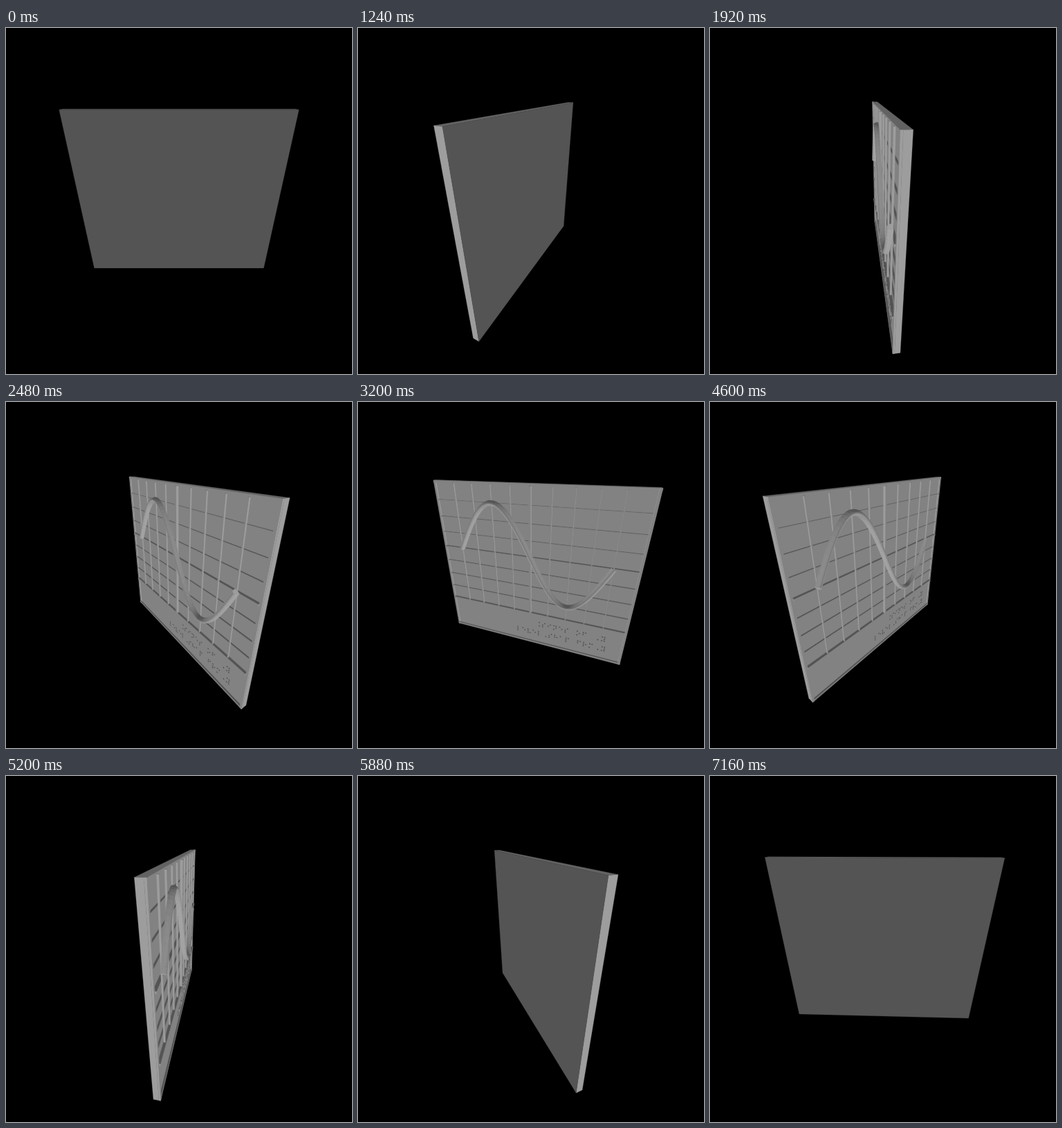
An HTML page with a canvas that plays this animation: 500 by 500 pixels, repeating every 7.2 s.

```html
<!DOCTYPE html>
<html lang="en">
<head>
<meta charset="utf-8">
<title>Turning tactile plate</title>
<style>
  html, body { margin: 0; width: 100%; height: 100%; overflow: hidden; background: #000; }
  canvas { display: block; width: 500px; height: 500px; }
</style>
</head>
<body>
<canvas id="stage" width="500" height="500"></canvas>
<script>
const ctx = document.getElementById("stage").getContext("2d");

// Camera: looks at the centre of the plate from slightly above its top edge.
const FOCAL = 329, DIST = 2, CAM_Z = 1.0164;
const PITCH = Math.atan2(CAM_Z, DIST);
const CP = Math.cos(PITCH), SP = Math.sin(PITCH);

// Plate: s runs right as seen from the front, z up, y out of the front face.
const W = 0.965, H = 0.8405, BACK = -0.0335, FRONT = 0.0255;
const LIP = 0.018, PANEL = FRONT - 0.014;
const AXIS_Z = 0.192, STEP_S = 0.1875, STEP_Z = 0.158;
const FLOOR_Z = AXIS_Z - 4 * STEP_Z;
const SHADE = { front: 130, back: 84, side: 157, rim: 98, ledge: 84, dot: 74 };

const ROWS = [
  { text: "⠨⠎⠊⠝⠑⠎⠀⠕⠋⠀⠠⠽", s: 0.09, z: -0.57 },
  { text: "⠇⠑⠧⠑⠇⠠⠎⠓⠁⠏⠀⠋⠗⠍⠠⠽", s: -0.14, z: -0.695 }
];

let cos, sin, camS, camY;

function project([s, z, y]) {
  const x = -s * cos - y * sin;
  const far = DIST - s * sin + y * cos;
  const up = z - CAM_Z;
  const k = FOCAL / (far * CP - up * SP);
  return [250 + x * k, 250 - (far * SP + up * CP) * k];
}

function poly(points, level) {
  const v = Math.round(level);
  ctx.fillStyle = ctx.strokeStyle = `rgb(${v},${v},${v})`;
  ctx.beginPath();
  points.forEach(p => ctx.lineTo(...project(p)));
  ctx.closePath();
  ctx.fill();
  ctx.stroke();
}

function box(s0, s1, z0, z1, y0, y1, top = SHADE.ledge) {
  const wall = s => poly([[s, z0, y0], [s, z1, y0], [s, z1, y1], [s, z0, y1]], SHADE.side);
  const face = (y, level) => poly([[s0, z0, y], [s1, z0, y], [s1, z1, y], [s0, z1, y]], level);
  poly([[s0, z1, y0], [s1, z1, y0], [s1, z1, y1], [s0, z1, y1]], top);
  if (camS > s1) wall(s1);
  if (camS < s0) wall(s0);
  if (camY > y1) face(y1, SHADE.front);
  if (camY < y0) face(y0, SHADE.back);
}

// Far parts first, so near ones cover them.
const farToNear = list => camS > 0 ? list : list.slice().reverse();

const MINOR = { half: 0.003, top: PANEL + 0.014 };
const MAJOR = { half: 0.008, top: PANEL + 0.024 };

function drawGrid() {
  for (let k = 3; k >= -4; k--) {
    const { half, top } = k % 4 ? MINOR : MAJOR;
    const z = AXIS_Z + k * STEP_Z;
    box(-W + LIP, W - LIP, z - half, z + half, PANEL, top);
  }
  for (const k of farToNear([-4, -3, -2, -1, 0, 1, 2, 3, 4])) {
    const { half, top } = k ? MINOR : MAJOR;
    box(k * STEP_S - half, k * STEP_S + half, FLOOR_Z, H - LIP, PANEL, top);
  }
}

const SEGS = 64, FACETS = 8, TUBE = 0.023, RISE = 0.042;

function ringAt(i) {
  const a = 2 * Math.PI * i / SEGS, amp = 3 * STEP_Z;
  const s = (i / SEGS - 0.5) * 8 * STEP_S;
  const z = AXIS_Z + amp * Math.sin(a);
  const slope = amp * Math.cos(a) * 2 * Math.PI / (8 * STEP_S);
  const len = Math.hypot(1, slope);
  const ns = -slope / len, nz = 1 / len;
  const pts = [];
  for (let k = 0; k <= FACETS; k++) {
    const b = Math.PI * k / FACETS, r = TUBE * Math.cos(b);
    pts.push([s + ns * r, z + nz * r, PANEL + RISE * Math.sin(b)]);
  }
  return { pts, ns, nz };
}

const rings = Array.from({ length: SEGS + 1 }, (_, i) => ringAt(i));
const order = Array.from({ length: SEGS }, (_, i) => i);

// Ambient light plus one low lamp on either side of the front.
function lit(ns, nz, ny) {
  const lamp = side => Math.max(0, 73 * side * ns + 23 * ny - 28 * nz);
  return SHADE.back + lamp(1) + lamp(-1);
}

function drawCurve() {
  for (const i of farToNear(order)) {
    const { pts: p, ns, nz } = rings[i], q = rings[i + 1].pts;
    for (let k = 0; k < FACETS; k++) {
      const b = Math.PI * (k + 0.5) / FACETS;
      const across = Math.cos(b) / TUBE, out = Math.sin(b) / RISE;
      const len = Math.hypot(across, out);
      const n = [ns * across / len, nz * across / len, out / len];
      const [s, z, y] = p[k];
      if ((camS - s) * n[0] + (CAM_Z - z) * n[1] + (camY - y) * n[2] <= 0) continue;
      poly([p[k], p[k + 1], q[k + 1], q[k]], lit(...n));
    }
  }
  if (camS > 4 * STEP_S) poly(rings[SEGS].pts, SHADE.side);
  if (camS < -4 * STEP_S) poly(rings[0].pts, SHADE.side);
}

// Braille code points: bits 0-2 left column, bits 3-5 right column.
function drawBraille() {
  const r = 0.0048, gap = 0.024, y = PANEL + 0.006;
  for (const row of ROWS) {
    [...row.text].forEach((ch, i) => {
      const bits = ch.codePointAt(0) - 0x2800;
      for (let b = 0; b < 6; b++) {
        if (!(bits >> b & 1)) continue;
        const s = row.s + i * 0.0615 + (b > 2 ? gap : 0) - gap / 2;
        const z = row.z + gap * (1 - b % 3);
        poly([[s - r, z - r, y], [s + r, z - r, y], [s + r, z + r, y], [s - r, z + r, y]], SHADE.dot);
      }
    });
  }
}

function drawFront() {
  const sides = farToNear([-1, 1]);
  const lip = side => side < 0
    ? box(-W, -W + LIP, -H, H, PANEL, FRONT, SHADE.rim)
    : box(W - LIP, W, -H, H, PANEL, FRONT, SHADE.rim);
  lip(sides[0]);
  box(-W, W, H - LIP, H, PANEL, FRONT, SHADE.rim);
  box(-W, W, -H, -H + LIP, PANEL, FRONT);
  drawGrid();
  drawBraille();
  drawCurve();
  lip(sides[1]);
}

function draw(angle) {
  cos = Math.cos(angle);
  sin = Math.sin(angle);
  camS = DIST * sin;
  camY = -DIST * cos;
  ctx.fillStyle = "#000";
  ctx.fillRect(0, 0, 500, 500);
  ctx.lineWidth = 0.3;
  ctx.lineJoin = "round";
  const open = camY > FRONT;
  box(-W, W, -H, H, BACK, open ? PANEL : FRONT, SHADE.rim);
  if (open) drawFront();
}

// 180 poses of 40 ms, two degrees apart.
const start = performance.now();
function tick() {
  const pose = Math.floor((performance.now() - start) / 40) % 180;
  draw(pose * Math.PI / 90);
  requestAnimationFrame(tick);
}
tick();
</script>
</body>
</html>
```
